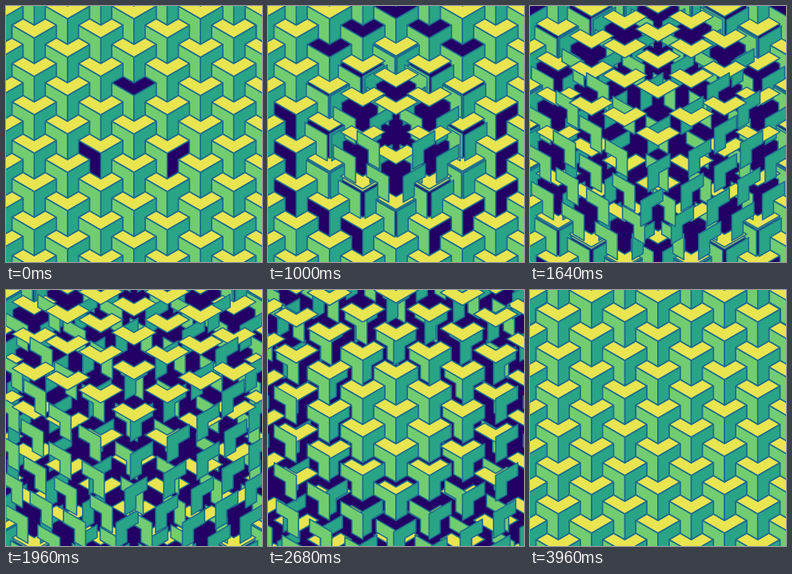
Recreate the animation shown at these times as an HTML page with a canvas. Size 320 px wide and 320 px high, loop 4000 ms.

```html
<!DOCTYPE html>
<html lang="en">
<head>
<meta charset="utf-8">
<title>Drifting cubes</title>
<style>
  html, body { margin: 0; width: 100%; height: 100%; overflow: hidden; background: #220065; }
  canvas { display: block; width: 320px; height: 320px; }
</style>
</head>
<body>
<canvas id="stage" width="320" height="320"></canvas>
<script>
const ctx = document.getElementById('stage').getContext('2d');
const LOOP = 4000, STEP = 40;
const TRAVEL = 2000;        // ms for a face to reach the neighbouring cube
const DELAY = 8;            // ms per pixel of distance from the centre
const SPACING = 48, UNIT = 16, CENTRE = 160;
const COS30 = Math.sqrt(3) / 2;

// A cube face without its far corner, in units along the two face edges.
const notchedFace = [[0, 0], [2, 0], [2, 1], [1, 1], [1, 2], [0, 2]];

const direction = degrees => {
  const a = degrees * Math.PI / 180;
  return [Math.cos(a), Math.sin(a)];
};

// Each face drifts along the diagonal between its two edges.
const faces = [
  { angle: 150, color: '#72cd70' },
  { angle: 30, color: '#29a487' },
  { angle: 270, color: '#e9e550' }
].map(({ angle, color }) => {
  const [ax, ay] = direction(angle - 60);
  const [bx, by] = direction(angle + 60);
  const path = new Path2D();
  for (const [a, b] of notchedFace) {
    path.lineTo(UNIT * (a * ax + b * bx), UNIT * (a * ay + b * by));
  }
  path.closePath();
  return { path, color, drift: direction(angle) };
});

// Distant cubes first, so that nearer ones lie on top.
const cubes = [];
for (let column = -7; column <= 7; column++) {
  for (let row = -7; row <= 7; row++) {
    const x = column * SPACING * COS30;
    const y = (row + Math.abs(column % 2) / 2) * SPACING;
    cubes.push({ x, y, distance: Math.round(Math.hypot(x, y) * 100) / 100 });
  }
}
cubes.sort((a, b) => b.distance - a.distance || a.y - b.y || b.x - a.x);

function driftAt(time, distance) {
  const local = (time - distance * DELAY + 2 * LOOP) % LOOP;
  const progress = Math.min(local / TRAVEL, 1);
  return SPACING * (1 - Math.cos(Math.PI * progress)) / 2;
}

function draw(time) {
  ctx.setTransform(1, 0, 0, 1, 0, 0);
  ctx.fillStyle = '#220065';
  ctx.fillRect(0, 0, 320, 320);
  ctx.strokeStyle = '#1d6d8e';
  ctx.lineWidth = 1.6;
  ctx.lineJoin = 'round';
  for (const { x, y, distance } of cubes) {
    const shift = driftAt(time, distance);
    for (const { path, color, drift } of faces) {
      ctx.setTransform(1, 0, 0, 1, CENTRE + x + shift * drift[0], CENTRE + y + shift * drift[1]);
      ctx.fillStyle = color;
      ctx.fill(path);
      ctx.stroke(path);
    }
  }
}

const start = performance.now();
function tick() {
  const elapsed = (performance.now() - start) % LOOP;
  draw(Math.floor(elapsed / STEP) * STEP);
  requestAnimationFrame(tick);
}
tick();
</script>
</body>
</html>
```
